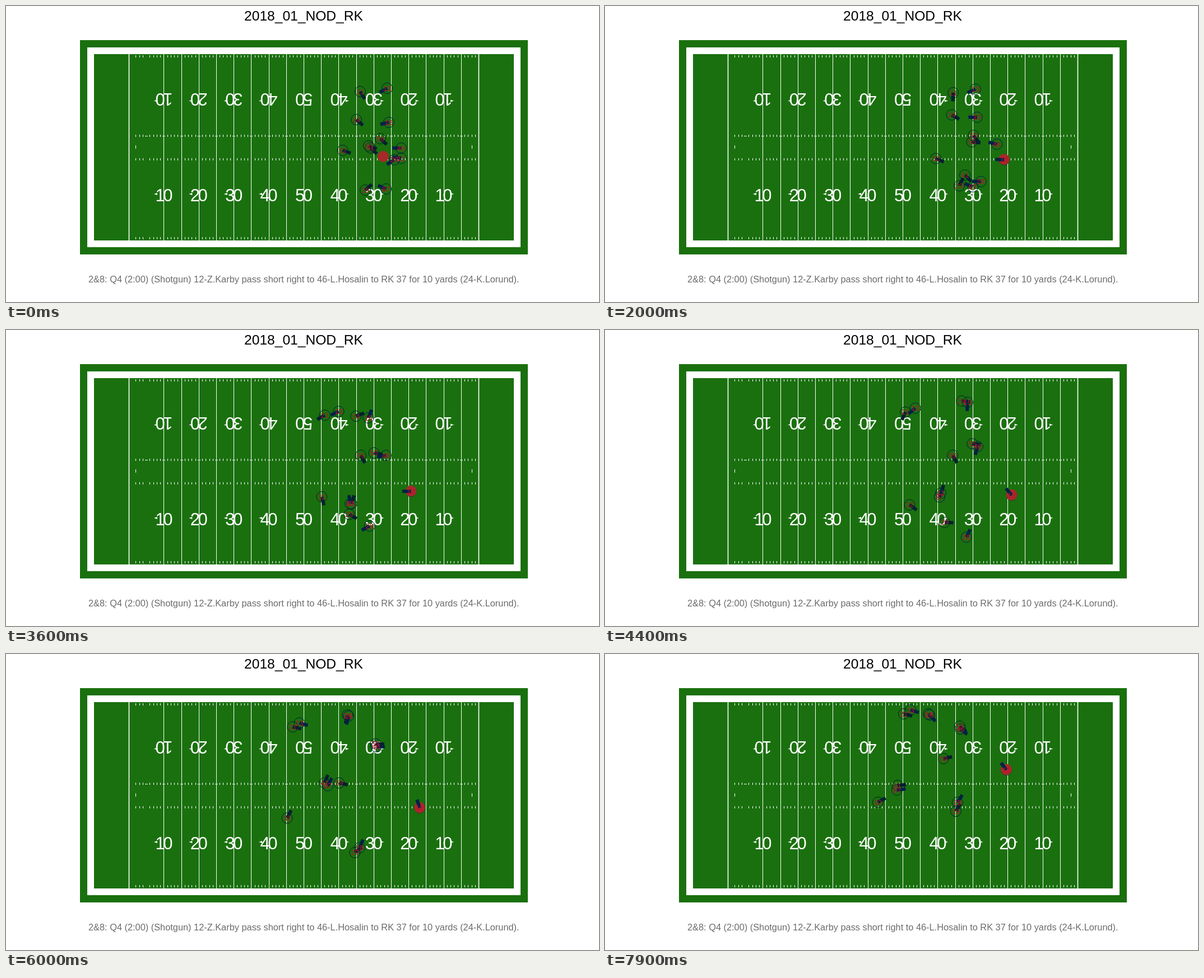
Write an HTML page that moves like this. It is 1058 by 529 pixels and loops after 8 s.

```html
<!DOCTYPE html>
<html lang="en">
<head>
<meta charset="utf-8">
<title>Play animation</title>
<style>
  html, body { margin: 0; width: 100%; height: 100%; overflow: hidden; background: #fff; }
  svg { display: block; width: 100%; height: 100%; }
  text { font-family: "Liberation Sans", Arial, sans-serif; text-anchor: middle; }
  .yards { font-size: 31px; letter-spacing: -3.5px; fill: #fff; }
  .jersey { font-size: 13px; }
</style>
</head>
<body>
<svg id="stage" viewBox="0 0 1058 529"></svg>
<script>
const stage = document.getElementById('stage');

function add(tag, attrs, parent = stage, content = '') {
  const node = document.createElementNS('http://www.w3.org/2000/svg', tag);
  for (const key in attrs) node.setAttribute(key, attrs[key]);
  node.textContent = content;
  parent.append(node);
  return node;
}

// ---- Field, laid out in yards ----
const YARD = 6.24, GOAL = 219.5, TOP = 86;
const yardX = n => GOAL + YARD * n;
const box = (x, y, width, height, fill = '#fff') => add('rect', { x, y, width, height, fill });
const line = (n, y, length) => box(Math.floor(yardX(n)), y, 1, length);

function turf(margin, fill) {
  const left = Math.round(yardX(-10 - margin)), top = Math.round(TOP - margin * YARD);
  const right = Math.round(yardX(110 + margin));
  const bottom = Math.round(TOP + (160 / 3 + margin) * YARD);
  box(left, top, right - left, bottom - top, fill);
}
turf(4, '#1a700e');
turf(2, '#fff');
turf(0, '#1a700e');

for (const n of [0, 100]) box(yardX(n) - 0.8, TOP, 1.6, 333);
for (let n = 2; n < 100; n++) {
  if (n % 5) for (const y of [88, 230, 272, 413]) line(n, y, 4);
  else box(Math.floor(yardX(n)) - 2, 232, 5, 1);
  if (n % 5 === 0 && n > 5) line(n, TOP, 333);
}
for (const n of [2, 98]) line(n, 249, 6);

for (let n = 10; n < 100; n += 10) {
  const x = yardX(n), label = Math.min(n, 100 - n), side = Math.sign(n - 50);
  for (const turn of [0, 180]) {
    add('text', { x: x - 1.75, y: 349, class: 'yards', transform: `rotate(${turn} ${x} 252.4)` }, stage, label);
  }
  if (side) for (const y of [169.5, 336]) {
    add('path', { d: `M${x + side * 12} ${y - 2}v4l${side * 6}-2z`, fill: '#fff' });
  }
}

// ---- Text ----
add('text', { x: 531, y: 26, 'font-size': 24.6 }, stage, '2018_01_NOD_RK');
add('text', { x: 531.3, y: 494, 'font-size': 16.35, fill: '#6b6b6b' }, stage,
  '2&8: Q4 (2:00) (Shotgun) 12-Z.Karby pass short right to 46-L.Hosalin to RK 37 for 10 yards (24-K.Lorund).');

// ---- Motion, in seconds ----
const END = 7.9, BEAT = 1.7, SNAP = 1.1, CATCH = 1.55, SETTLED = 5;

const progress = (t, from, to) => Math.min(1, Math.max(0, (t - from) / (to - from)));
const mix = (a, b, k) => a.map((value, axis) => value + (b[axis] - value) * k);

// Spline through points one beat apart, the last reached at END; waits on the first
function route(text) {
  const points = text.split(' ').map(pair => pair.split(',').map(Number));
  const last = points.length - 1;
  const at = i => points[Math.min(last, Math.max(0, i))];
  return t => {
    const u = Math.max(0, last + (t - END) / BEAT);
    const i = Math.min(last - 1, Math.floor(u)), s = u - i;
    return [0, 1].map(axis => {
      const [a, b, c, d] = [-1, 0, 1, 2].map(k => at(i + k)[axis]);
      return b + s / 2 * (c - a + s * (2 * a - 5 * b + 4 * c - d + s * (3 * (b - c) + d - a)));
    });
  };
}

// A defender who closes in on one receiver
function cover(receiver, startGap, endGap) {
  return t => {
    const gap = mix(startGap, endGap, progress(t, SNAP, SETTLED));
    return receiver(t).map((value, axis) => value + gap[axis]);
  };
}

const passer = route('705,272 719,279 726,295 738,270 716,207');
const wideReceiver = route('680,147 634,149 550,139 523,121 545,100');
const slotReceiver = route('683,208 647,184 646,127 607,110 579,109');
const fullback = route('705,254 691,237 664,206 659,161 634,134');
const runningBack = route('693,264 688,301 655,326 644,371 630,340 629,265');
const tightEnd = route('678,327 633,317 595,296 570,231 521,243');

// Offence looks downfield first, then back to the ball; defence watches the passer
const DOWNFIELD = [500, 250];
const lookBackTo = path => t => mix(DOWNFIELD, path(t), progress(t, SNAP, SETTLED));

// The body turns between what it watches and where it runs
function facing(path, gaze, t) {
  const [x, y] = path(t), [gx, gy] = gaze(t);
  const [ax, ay] = path(t - 0.1), [bx, by] = path(t + 0.1);
  const distance = Math.hypot(gx - x, gy - y), speedScale = 0.2 * 30;
  return Math.atan2((gy - y) / distance + (by - ay) / speedScale,
                    (gx - x) / distance + (bx - ax) / speedScale) * 180 / Math.PI;
}

// ---- Players ----
const rings = add('g', {});
const ball = add('circle', { r: 10, fill: '#a52a2a' });
const bars = add('g', {}), numbers = add('g', {});

function player(number, path, gaze, dark, red) {
  const ring = add('circle', { r: 9.5, fill: 'none', stroke: dark }, rings);
  const bar = add('rect', { y: -3, width: 15.5, height: 6, fill: dark }, bars);
  const label = add('text', { y: 4.6, class: 'jersey', fill: red }, numbers, number);
  return t => {
    const place = `translate(${path(t)})`;
    bar.setAttribute('transform', `${place} rotate(${facing(path, gaze, t)})`);
    ring.setAttribute('transform', place);
    label.setAttribute('transform', place);
  };
}
const defender = (number, path) => player(number, path, passer, '#03202f', '#a71930');
const attacker = (number, path, target = passer) =>
  player(number, path, lookBackTo(target), '#002244', '#c60c30');

const players = [
  defender(21, cover(wideReceiver, [-48, 6], [-12, 7])),
  defender(24, cover(slotReceiver, [-58, -5], [-2, -2])),
  defender(55, cover(fullback, [-58, -4], [-1, -5])),
  defender(59, route('668,237 645,226 619,224 593,229 604,187')),
  defender(41, route('650,245 649,277 632,317 597,289 564,226 522,235')),
  defender(32, route('601,255 597,266 580,281 541,313 498,290 487,265')),
  defender(29, route('641,329 622,318 606,345 624,352 626,281')),
  attacker(13, wideReceiver),
  attacker(15, slotReceiver),
  attacker(46, fullback),
  attacker(28, runningBack),
  attacker(87, tightEnd),
  attacker(12, passer, fullback)
];

function draw(t) {
  players.forEach(move => move(t));
  const [x, y] = mix([673, 269.5], passer(t), progress(t, SNAP - 0.05, CATCH));
  ball.setAttribute('cx', x);
  ball.setAttribute('cy', y - 0.5);
}

// The picture advances ten times a second
function frame() {
  draw(Math.floor(performance.now() % 8000 / 100) / 10);
  requestAnimationFrame(frame);
}
frame();
</script>
</body>
</html>
```
